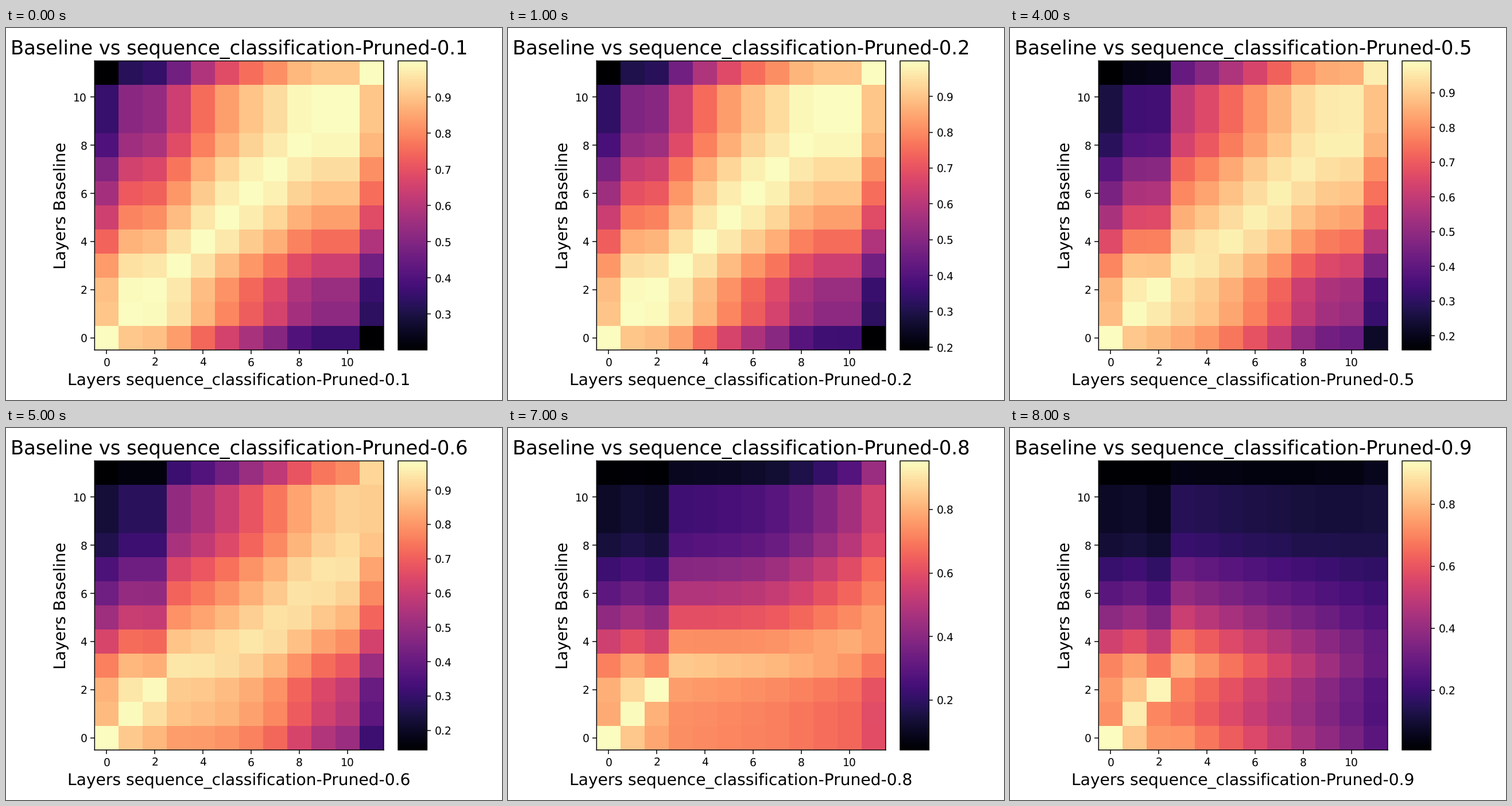
A matplotlib script for the animation above (9000 ms loop, 864x648 px).

```python
import numpy as np
import matplotlib.pyplot as plt
from matplotlib.animation import FuncAnimation
from mpl_toolkits.axes_grid1 import make_axes_locatable

N = 12
MODEL = "sequence_classification-Pruned"

plt.rcParams.update({
    "font.family": "DejaVu Sans",
    "text.hinting": "none",
    "path.snap": False,
})

# Where each unpruned layer sits along a line; similarity falls with distance.
PLACE = np.array([-3, 0, 0.6, 3.5, 7, 10, 12.5, 14.5, 17.3, 18.5, 18.5, 22.5])
MERGE = PLACE[3]

# Colour range at a few pruning levels.
LEVELS = [0.1, 0.4, 0.6, 0.7, 0.8, 0.9]
LOW = [0.2005, 0.1765, 0.143, 0.074, 0.0425, 0.007]
HIGH = [0.9995, 0.998, 0.985, 0.971, 0.953, 0.94]

layer = np.arange(N)
early = layer < 3


def similarity(p):
    """Similarity of baseline rows to pruned columns, scaled to 0..1."""
    s = p / 0.9
    rows = PLACE.copy()
    rows[0] += 4.5 * s**2

    # Early columns drift to the first layer, later ones collapse in turn.
    keep = 1 / (1 + np.exp((p - 0.49 - 0.034 * (layer - 4)) / 0.07))
    cols = np.where(early,
                    rows + (rows[0] - rows) * 0.8 * s**2,
                    MERGE + (PLACE - MERGE) * keep)
    dist = abs(rows[:, None] - cols) ** 1.4

    # The end layers are set apart from all the others.
    row_gap = np.zeros(N)
    row_gap[0], row_gap[-1] = 7 * (1 - s**2), 5
    col_gap = np.where(early, 4 * layer * s**2, 0)
    col_gap[0], col_gap[-1] = 7, 5 * keep[-1]
    dist += (row_gap[:, None] + col_gap) * (1 - np.eye(N))

    sharp = 1 + 1.9 * s**2 * np.where(early, 1, (1 - keep) ** 6)
    peak = np.where(early, 1, 1 - 0.16 * s**3 - 0.065 * (layer - 3) * s**18)
    return peak * np.clip(1 - dist / 100, 0, 1) ** sharp


fig, ax = plt.subplots(figsize=(6.4, 4.8), dpi=135, facecolor="white")
image = ax.imshow(np.eye(N), origin="lower", cmap="magma",
                  interpolation="nearest")
cax = make_axes_locatable(ax).append_axes("right", size="10%", pad="5%")
fig.colorbar(image, cax=cax)
ax.set_xticks(range(0, N, 2))
ax.set_yticks(range(0, N, 2))
ax.set_ylabel("Layers Baseline", fontsize=15)


def draw(i):
    p = (i + 1) / 10
    lo, hi = np.interp(p, LEVELS, LOW), np.interp(p, LEVELS, HIGH)
    image.set_data(lo + (hi - lo) * similarity(p))
    image.set_clim(lo, hi)
    name = f"{MODEL}-{p:.1f}"
    ax.set_title(f"Baseline vs {name}", fontsize=18)
    ax.set_xlabel(f"Layers {name}", fontsize=15)
    return [image]


draw(0)
fig.tight_layout()

anim = FuncAnimation(fig, draw, frames=9, interval=1000, repeat=True,
                     repeat_delay=0, blit=False)
plt.show()
```
